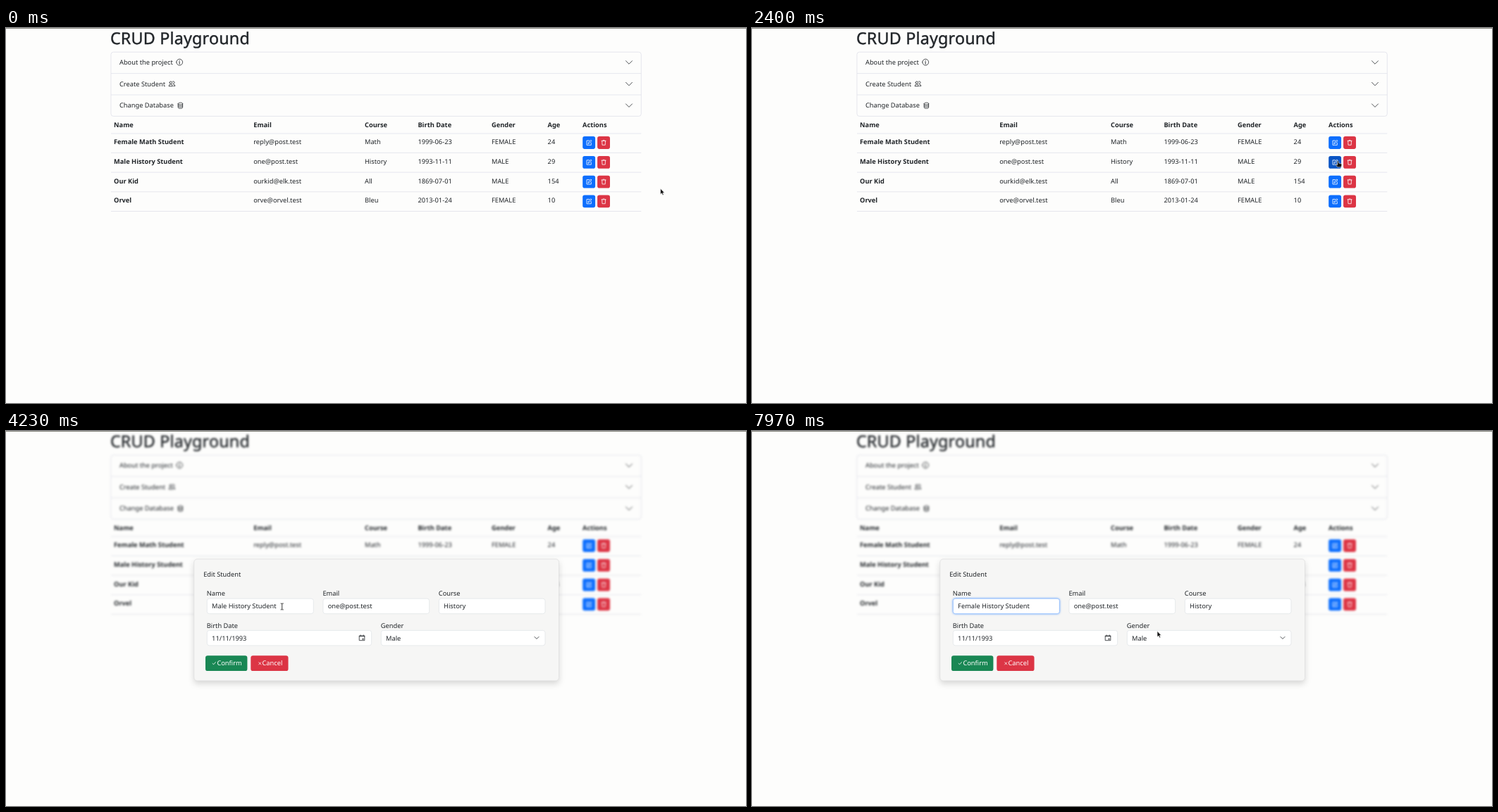
Animation, 1050 px wide and 533 px high, one loop 8000 ms. Source, as an HTML page:

```html
<!DOCTYPE html>
<html lang="en">
<head>
<meta charset="utf-8">
<title>CRUD Playground</title>
<style>
  html, body { margin: 0; width: 100%; height: 100%; overflow: hidden; background: #fdfdfc; }
  svg { display: block; width: 1050px; height: 533px; }
  text {
    font: 9.28px "Noto Sans", "Open Sans", sans-serif;
    fill: #212529; white-space: pre; text-rendering: geometricPrecision;
  }
  .bold { font-weight: 700; }
  .title { font-size: 23.3px; font-weight: 500; letter-spacing: .2px; stroke: #212529; stroke-width: .4; }
  .light { fill: #fff; }
  .line { fill: none; stroke: #e0e1ea; stroke-width: .8; }
  .icon { fill: none; stroke: #212529; stroke-width: .8; stroke-linecap: round; stroke-linejoin: round; }
  .white { stroke: #fff; }
  .field { fill: #fff; stroke: #dee2e6; stroke-width: .7; }
  #modal > .panel { fill: #f6f6f5; stroke: #dcdcdc; stroke-width: .7; filter: drop-shadow(0 4px 4px rgba(0,0,0,.15)); }
</style>
</head>
<body>
<svg viewBox="0 0 1050 533">
  <g id="page"></g>
  <rect width="1050" height="1" fill="#8b8b84"/>
  <g id="modal"></g>
  <g id="cursor">
    <path id="arrow" d="M0 0V8.2L1.9 6.5L3.2 9.4L4.6 8.8L3.4 6H5.8Z" fill="#111" stroke="#fff" stroke-width=".6"/>
    <path id="hand" d="M-.9 .6Q0-.6 .9 .6V3.2L4.6 4.2Q5.4 4.6 5.2 6L4.5 9H-.7L-3.2 5.6Q-2.6 4.6-.9 6Z" fill="#111" stroke="#fff" stroke-width=".5"/>
    <path id="beam" d="M-2-4.4H-.5L0-4L.5-4.4H2M0-4V4M-2 4.4H-.5L0 4L.5 4.4H2" fill="none" stroke="#222" stroke-width=".9"/>
  </g>
</svg>
<script>
const LOOP = 8000;
const $ = id => document.getElementById(id);

function add(parent, tag, attrs, label) {
  const node = document.createElementNS("http://www.w3.org/2000/svg", tag);
  for (const key in attrs) node.setAttribute(key, attrs[key]);
  if (label !== undefined) node.textContent = label;
  parent.append(node);
  return node;
}
const page = $("page"), modal = $("modal");
const text = (parent, x, y, label, cls = "") => add(parent, "text", { x, y: Math.round(y), class: cls }, label);
const rect = (parent, x, y, width, height, rx, attrs) => add(parent, "rect", { x, y, width, height, rx, ...attrs });
const icon = (parent, x, y, d, cls = "") =>
  add(parent, "path", { d, class: "icon " + cls, transform: `translate(${x} ${y})` });

// Page
text(page, 147.9, 23, "CRUD Playground", "title");
rect(page, 148.9, 34.2, 752.4, 91.2, 3.5, { class: "line" });
["About the project", "Create Student", "Change Database"].forEach((label, i) => {
  const y = 48.9 + i * 30.6;
  text(page, 161, y + 3.3, label);
  icon(page, 884, y, "M-4.5-2.2L0 2.3L4.5-2.2");
  if (i) add(page, "path", { d: `M149 ${34.2 + i * 30.4}H901.3`, class: "line" });
});
icon(page, 246.2, 48.6, "M-4.4 0A4.4 4.4 0 1 1 4.4 0A4.4 4.4 0 1 1-4.4 0M.2-2.2V-2M-.6-.6H.2L-.4 2.3H.5");
icon(page, 235.5, 79.2, "M-4.4 3.2Q-4.2 .6-1.8 .6T.8 3.2ZM-3.4-1.6A1.7 1.7 0 1 1 0-1.6A1.7 1.7 0 1 1-3.4-1.6M1-3.2A1.7 1.7 0 1 1 1.4-.1M2 .6Q4.2 .8 4.4 3.2H2.2");
icon(page, 247.4, 110.2, "M-3.2-2.8C-3.2-4.6 3.2-4.6 3.2-2.8S-3.2-1-3.2-2.8V2.8C-3.2 4.6 3.2 4.6 3.2 2.8V-2.8M-3.2-.9C-3.2 .9 3.2 .9 3.2-.9M-3.2 1C-3.2 2.8 3.2 2.8 3.2 1");

const columns = [153, 351.2, 509, 584.4, 689, 768.6, 818.1];
["Name", "Email", "Course", "Birth Date", "Gender", "Age", "Actions"]
  .forEach((label, i) => text(page, columns[i], 141, label, "bold"));
add(page, "path", { d: "M149 150H901.3", class: "line" });

const rows = [
  ["Female Math Student", "reply@post.test", "Math", "1999-06-23", "FEMALE", "24"],
  ["Male History Student", "one@post.test", "History", "1993-11-11", "MALE", "29"],
  ["Our Kid", "ourkid@elk.test", "All", "1869-07-01", "MALE", "154"],
  ["Orvel", "orve@orvel.test", "Bleu", "2013-01-24", "FEMALE", "10"]
];
const editButtons = rows.map((row, i) => {
  const y = 164.95 + i * 27.8, mid = 163 + i * 27.8;
  row.forEach((label, c) => text(page, columns[c], y, label, c ? "" : "bold"));
  add(page, "path", { d: `M149 ${177.4 + i * 27.7}H901.3`, class: "line" });
  const button = (x, fill) => rect(page, x, mid - 8.9, 17.9, 17.8, 2.8, { fill });
  const edit = button(818.2, "#0d6efd");
  icon(page, 827.2, mid, "M.4-3H-3.2V3.4H3.1V.2M-1.2 1.2L-.8-.3L2.7-3.6L3.8-2.6L.4 .9Z", "white");
  button(839.1, "#dc3545");
  icon(page, 848.1, mid, "M-3-2.6H3M-.9-3.4H.9M-2.4-2.6L-2.1 3.3H2.1L2.4-2.6", "white");
  return edit;
});

// Edit dialog
rect(modal, 266.8, 182, 517.8, 173, 4.5, { class: "panel" });
text(modal, 280.2, 206.5, "Edit Student");
const fields = [
  ["Name", "", 285.3, 238.2, 151], ["Email", "one@post.test", 449.9, 238.2, 150.7],
  ["Course", "History", 614.3, 238.2, 150.7], ["Birth Date", "11/11/1993", 285.3, 283.4, 233.3],
  ["Gender", "Male", 532.3, 283.4, 232.7]
];
const inputs = fields.map(([label, value, x, y, w]) => {
  text(modal, x - .5, y - 3.8, label);
  const box = rect(modal, x, y, w, 21.5, 3.2, { class: "field" });
  return { box, value: text(modal, x + 6.8, y + 14.1, value) };
});
const [nameInput] = inputs;
const caret = rect(modal, 0, 243, .9, 11.5, 0, { fill: "#111" });
icon(modal, 505.2, 294, "M-3.6-3H3.6V3.7H-3.6ZM-3.6-2.2H3.6M-2-4V-3M2-4V-3M1 1.2H2V2.2H1Z");
icon(modal, 753, 294, "M-3-1.5L0 1.5L3-1.5");
rect(modal, 283, 319.3, 59.4, 21.8, 3.2, { fill: "#198754" });
icon(modal, 295.2, 330.2, "M-2.1 .2L-.6 1.6L2.2-1.6", "white");
text(modal, 299.4, 333.4, "Confirm", "light");
rect(modal, 347.3, 319.3, 53.2, 21.8, 3.2, { fill: "#dc3545" });
icon(modal, 360.3, 330.4, "M-1.6-1.6L1.6 1.6M1.6-1.6L-1.6 1.6", "white");
text(modal, 363.5, 333.4, "Cancel", "light");

// Motion: time, x, y of the pointer
const path = [
  [0, 928.6, 228.2], [30, 928.6, 228.2], [270, 906, 236], [430, 900, 235], [1000, 430, 206],
  [1400, 347.5, 198.6], [1520, 350, 198.5], [2050, 790, 192], [2250, 831.5, 188.8],
  [2850, 831.5, 188.8], [3470, 543, 231.8], [3770, 505, 233.5], [4400, 367.3, 253],
  [7730, 367.3, 253], [7970, 575, 284.5], [8000, 575, 284.5]
];
const OPEN = 2600, FADE = 150, FOCUS = 4600;

// Editing: time, first word, caret index
const keys = [
  [0, "Male", 16], [FOCUS, "Male", 16], [4740, "Male", 13], [4840, "Male", 5], [5365, "Male", 4],
  [5700, "Mal", 3], [5850, "Ma", 2], [6000, "M", 1], [6170, "", 0], [6610, "F", 1],
  [6830, "Fe", 2], [6960, "Fem", 3], [7090, "Fema", 4], [7210, "Femal", 5], [7350, "Female", 6]
];

const clamp = v => Math.max(0, Math.min(1, v));
function pointerAt(t) {
  const i = Math.max(1, path.findIndex(p => p[0] >= t));
  const [t0, x0, y0] = path[i - 1], [t1, x1, y1] = path[i];
  const k = clamp((t - t0) / (t1 - t0)), e = k * k * (3 - 2 * k);
  return [x0 + (x1 - x0) * e, y0 + (y1 - y0) * e];
}
const inside = (x, y, l, t, w, h) => x >= l && x <= l + w && y >= t && y <= t + h;

function draw(t) {
  const open = t >= OPEN;
  page.style.filter = open ? "blur(1.35px)" : "none";
  modal.style.opacity = clamp((t - OPEN) / FADE);

  const [x, y] = pointerAt(t);
  const onEdit = !open && inside(x, y, 818.2, 181.9, 17.9, 17.8);
  const onText = open && fields.slice(0, 3).some(f => inside(x, y, f[2], f[3], f[4], 21.5));
  const shape = onEdit ? "hand" : onText ? "beam" : "arrow";
  for (const id of ["arrow", "hand", "beam"]) $(id).style.display = id === shape ? "" : "none";
  $("cursor").setAttribute("transform", `translate(${x} ${y})`);
  editButtons[1].setAttribute("fill", onEdit ? "#0b55c4" : "#0d6efd");

  const [since, word, index] = keys.filter(k => k[0] <= t).pop();
  const { box, value } = nameInput;
  const label = word + " History Student";
  if (value.textContent !== label) value.textContent = label;
  const glow = clamp((t - FOCUS) / 150);
  box.style.stroke = glow ? "#86b7fe" : "";
  box.style.filter = glow ? `drop-shadow(0 0 1.6px rgba(13,110,253,${.6 * glow}))` : "none";
  const blinkOn = t >= FOCUS && (t - since) % 1000 < 500;
  caret.style.display = blinkOn ? "" : "none";
  caret.setAttribute("x", 292 + (index ? value.getSubStringLength(0, index) : 0));
}

const start = performance.now();
function tick() {
  draw((performance.now() - start) % LOOP);
  requestAnimationFrame(tick);
}
tick();
</script>
</body>
</html>
```
